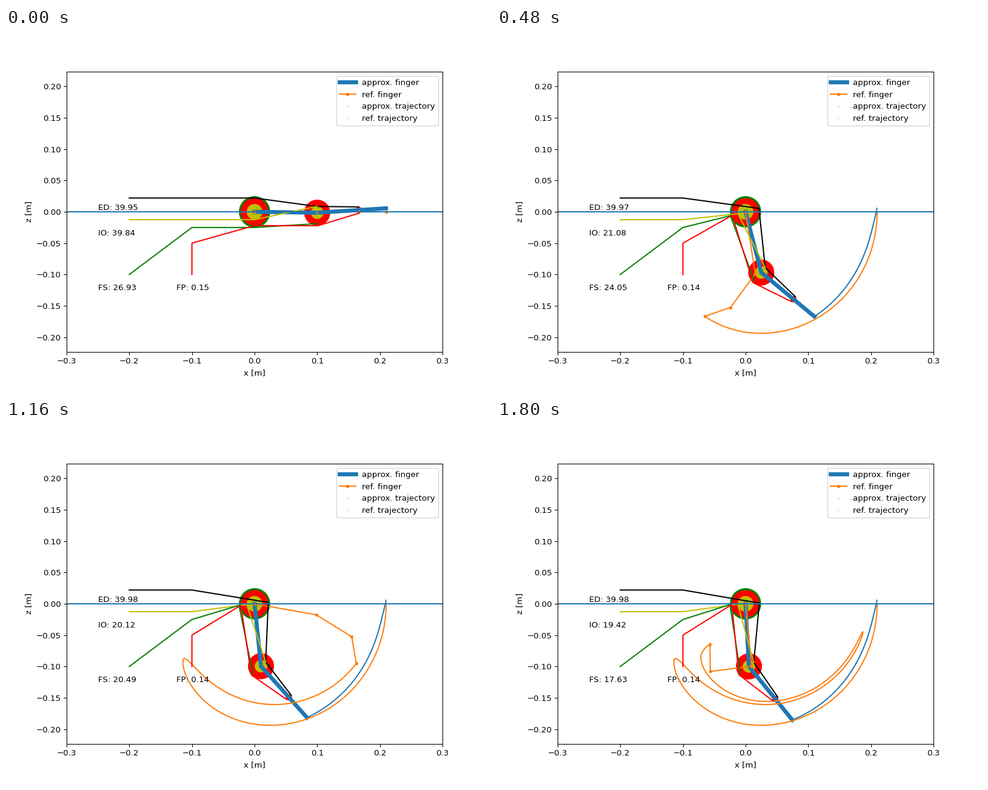
A matplotlib script that plays this animation: 800x600 px, repeating every 1840 ms.

```python
import numpy as np
import matplotlib.pyplot as plt
from matplotlib.animation import FuncAnimation

DPI = 96
FRAMES, STEP = 46, 40
SUB = 8  # trajectory samples per frame
BLUE, ORANGE = "C0", "C1"
LINKS = [.1, .0667, .0433]


def swing(*turns):
    """Cosine easing between (time, value) turning points."""
    times, values = np.array(turns, float).T

    def at(t):
        i = np.clip(np.searchsorted(times, t, side="right") - 1, 0, len(times) - 2)
        u = np.clip((t - times[i]) / (times[i + 1] - times[i]), 0, 1)
        return values[i] + (values[i + 1] - values[i]) * (1 - np.cos(np.pi * u)) / 2
    return at


# Time left before the approximated finger settles, 1 at the start
remaining = swing((-.12, 1.072), (.6, 0))


def base_angle(t):
    return -79 - 4.4 * t + 78.2 * remaining(t)


def bend_angle(t):
    return 36 * np.tanh(.09 - base_angle(t) / 24)


# Joint angles in degrees, time in seconds
APPROX = [base_angle, bend_angle, lambda t: 0 * t]
REF = [swing((-.12, 5.3), (.715, -100.5), (1.3, 4), (1.703, -87), (1.95, -79)),
       swing((-.06, .8), (.78, -63.3), (1.27, -16), (1.91, -94)),
       swing((.05, 0), (.9, -68), (1.24, -46), (1.81, -96.5))]


def fs_force(t):
    return 26.93 * np.exp(-.2354 * t)


# name: (force, text position)
FORCES = {
    "ED": (lambda t: 39.98 - .03 * np.exp(-3.4 * t), (-.25, .0025)),
    "IO": (lambda t: 15.12 + .244 * fs_force(t) + 18.14 * remaining(t) ** 2, (-.25, -.0375)),
    "FS": (fs_force, (-.25, -.125)),
    "FP": (lambda t: .14 + .01 * np.exp(-4 * t), (-.125, -.125)),
}
# colour, fixed points, signed radius at each joint
TENDONS = [
    ("k", [(-.2, .022), (-.1, .022)], [.022, .01, .005]),
    ("y", [(-.2, -.0125), (-.1, -.0125)], [-.0125, .01]),
    ("g", [(-.2, -.1), (-.1, -.025)], [-.025, -.0175]),
    ("r", [(-.1, -.1), (-.1, -.05)], [-.022, -.0208, -.005]),
]
# joint index, radius, colour
PULLEYS = [(0, .025, "g"), (0, .022, "r"), (0, .0125, "y"),
           (1, .0208, "r"), (1, .01, "y"), (2, .005, "r")]


def pose(joints, t):
    """Joint positions and absolute link angles at time t."""
    angles = np.radians(np.cumsum([q(t) for q in joints], axis=0))
    p = np.zeros((4,) + np.shape(t) + (2,))
    for i, (a, length) in enumerate(zip(angles, LINKS)):
        p[i + 1] = p[i] + length * np.stack([np.cos(a), np.sin(a)], axis=-1)
    return p, angles


fig, ax = plt.subplots(figsize=(800 / DPI, 600 / DPI), dpi=DPI)
ax.set_xlim(-.3, .3)
ax.set_ylim(-.22355, .22355)
ax.set_xlabel("x [m]")
ax.set_ylabel("z [m]")

finger, = ax.plot([], [], color=BLUE, lw=5, label="approx. finger")
ref, = ax.plot([], [], "o-", color=ORANGE, ms=3, label="ref. finger")
for name, shade in (("approx", "0.3"), ("ref", "0.6")):
    ax.plot([], [], "o", color=shade, ms=1, mew=0, label=f"{name}. trajectory")
finger_path, = ax.plot([], [], color=BLUE)
ref_path, = ax.plot([], [], color=ORANGE)
tendons = [ax.plot([], [], color=c)[0] for c, _, _ in TENDONS]
ax.axhline(0, color=BLUE)
pulleys = [ax.add_patch(plt.Circle((0, 0), r, color=c, lw=0)) for _, r, c in PULLEYS]
labels = {name: ax.text(*pos, "") for name, (_, pos) in FORCES.items()}
ax.legend(loc="upper right")

fine = np.arange((FRAMES - 1) * SUB + 1) * STEP / 1000 / SUB
finger_tip = pose(APPROX, fine)[0][3]
ref_tip = pose(REF, fine)[0][3]


def draw(n):
    t = n * STEP / 1000
    p, angles = pose(APPROX, t)
    normals = np.stack([-np.sin(angles), np.cos(angles)], axis=1)
    finger.set_data(*p.T)
    ref.set_data(*pose(REF, t)[0].T)

    end = n * SUB + 1
    finger_path.set_data(*finger_tip[:end].T)
    ref_path.set_data(*ref_tip[:end].T)

    for line, (_, fixed, radii) in zip(tendons, TENDONS):
        wraps = [p[i] + r * normals[i] for i, r in enumerate(radii)]
        line.set_data(*np.array(fixed + wraps).T)
    for disc, (joint, _, _) in zip(pulleys, PULLEYS):
        disc.center = p[joint]
    for name, (force, _) in FORCES.items():
        labels[name].set_text(f"{name}: {round(float(force(t)), 2)}")


anim = FuncAnimation(fig, draw, frames=FRAMES, interval=STEP, repeat=True, repeat_delay=0)
plt.show()
```
